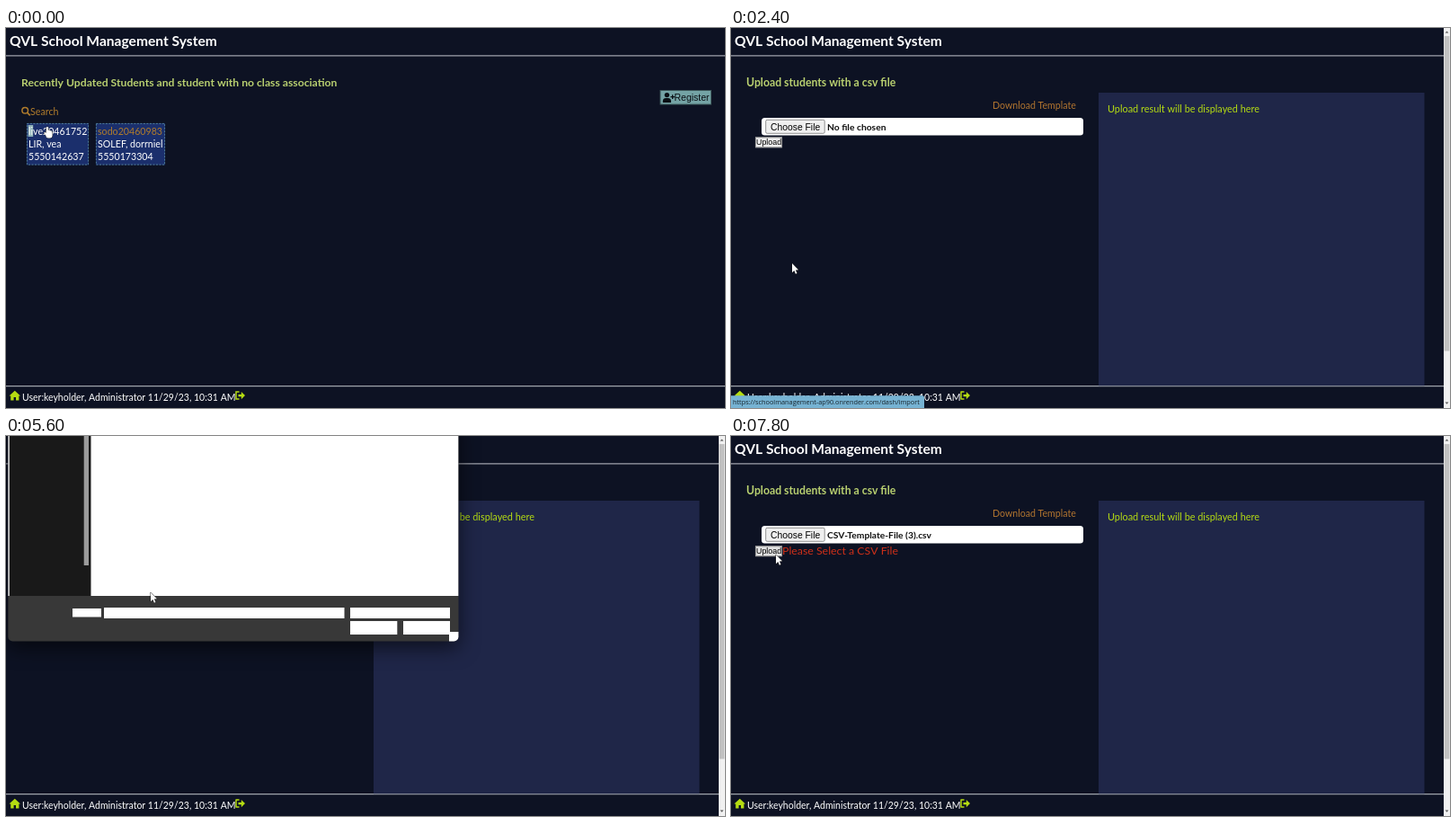
An HTML page with a canvas that plays this animation: 800x423 px, repeating every 8 s.

```html
<!DOCTYPE html>
<html lang="en">
<head>
<meta charset="utf-8">
<title>School management</title>
<style>
html, body { margin: 0; width: 100%; height: 100%; overflow: hidden; background: #0d1223; }
canvas { display: block; width: 800px; height: 423px; }
</style>
</head>
<body>
<canvas id="stage"></canvas>
<script>
const W = 800, H = 423, LOOP = 8000, STEP = 200;
const canvas = document.getElementById('stage');
const ctx = canvas.getContext('2d');
const ratio = window.devicePixelRatio || 1;
canvas.width = W * ratio;
canvas.height = H * ratio;

const LATO = 'Lato, sans-serif';
const ARIAL = '"Liberation Sans", sans-serif';
const SEGOE = '"Open Sans", sans-serif';
const BG = '#0d1223', LIME = '#b5dc12', HEAD = '#b9d070', LINK = '#b07c2c';

// Pointer stops: time, x, y
const path = [
  [0, 46, 110], [200, 44, 135], [400, 34, 230], [600, 18, 350], [800, 12, 399],
  [1000, 9, 404], [1200, 9, 405], [1600, 45, 330], [2000, 68, 262], [2400, 68, 262],
  [2800, 65, 220], [3400, 42, 129], [4200, 42, 129], [4600, 68, 107], [5000, 68, 107],
  [5400, 80, 115], [5600, 161, 174], [6000, 316, 190], [6400, 160, 60], [6800, 160, 60],
  [7200, 90, 122], [7600, 50, 132], [8000, 50, 132]
];

function pointerAt(t) {
  const i = path.findIndex(p => p[0] > t);
  const [t0, x0, y0] = path[i - 1], [t1, x1, y1] = path[i];
  const k = (t - t0) / (t1 - t0);
  return [x0 + (x1 - x0) * k, y0 + (y1 - y0) * k];
}

function rect(x, y, w, h, color) {
  ctx.fillStyle = color;
  ctx.fillRect(x, y, w, h);
}

function round(x, y, w, h, r, color) {
  ctx.fillStyle = color;
  ctx.beginPath();
  ctx.roundRect(x, y, w, h, r);
  ctx.fill();
}

function frame(x, y, w, h, color, r = 0, line = 0.8) {
  ctx.strokeStyle = color;
  ctx.lineWidth = line;
  ctx.beginPath();
  ctx.roundRect(x, y, w, h, r);
  ctx.stroke();
}

function poly(points, color) {
  ctx.fillStyle = color;
  ctx.beginPath();
  points.forEach(([x, y]) => ctx.lineTo(x, y));
  ctx.closePath();
  ctx.fill();
}

function line(points, color, width = 0.8) {
  ctx.strokeStyle = color;
  ctx.lineWidth = width;
  ctx.beginPath();
  points.forEach(([x, y]) => ctx.lineTo(x, y));
  ctx.stroke();
}

function dot(x, y, r, color) {
  ctx.fillStyle = color;
  ctx.beginPath();
  ctx.arc(x, y, r, 0, Math.PI * 2);
  ctx.fill();
}

function text(str, x, y, size, color, family = LATO, weight = 400, align = 'left') {
  ctx.font = `${weight} ${size}px ${family}`;
  ctx.fillStyle = color;
  ctx.textAlign = align;
  ctx.fillText(str, x, y);
}

const label = (str, x, y, align) => text(str, x, y + 2.6, 7.3, '#f2f2f2', SEGOE, 400, align);

function chevron(x, y, color = '#b5b5b5') {
  line([[x - 2, y - 1], [x, y + 1], [x + 2, y - 1]], color, 0.7);
}

function shell(right) {
  rect(0, 0, W, H, BG);
  text('QVL School Management System', 4, 20, 15.6, '#fff', LATO, 700);
  rect(0, 30.4, right, 1, '#c3c6cd');
  rect(0, 398.2, right, 1, '#c3c6cd');

  poly([[3.5, 409.6], [9.8, 403.8], [16, 409.6], [14.4, 409.6], [14.4, 414.4],
    [11, 414.4], [11, 411], [8.6, 411], [8.6, 414.4], [5.2, 414.4], [5.2, 409.6]], LIME);
  text('User:keyholder, Administrator 11/29/23, 10:31 AM', 18, 415, 10.5, '#fff');
  line([[259.5, 405], [256, 405], [256, 413], [259.5, 413]], LIME, 1.5);
  rect(258.5, 407.9, 4, 2.4, LIME);
  poly([[261.8, 405], [266, 409.1], [261.8, 413.2]], LIME);
}

function card(x, w, id, name, phone, hover) {
  rect(x, 106, w, 46.5, '#1b2f6c');
  ctx.setLineDash([2, 1.5]);
  frame(x + 0.4, 106.4, w - 0.8, 45.7, '#5d93a5');
  ctx.setLineDash([]);
  if (hover) rect(x + 1.6, 108, 5.6, 13, '#8fb3b8');
  text(id, x + 2, 118.5, 10.65, hover ? '#fff' : LINK);
  text(name, x + 2, 132.6, 10.65, '#fff');
  text(phone, x + 2, 146.8, 10.65, '#fff');
}

function studentsPage(t) {
  shell(W);
  text('Recently Updated Students and student with no class association', 17, 64.6, 12.2, HEAD, LATO, 700);

  rect(727.5, 69, 57.5, 16.5, '#3c5658');
  rect(728.5, 70, 55.5, 14.5, '#74a3a5');
  dot(735.4, 74.6, 2.7, '#0a0f14');
  round(730.8, 78, 9.2, 5, [3.5, 3.5, 0.5, 0.5], '#0a0f14');
  rect(739.4, 76, 4.6, 1.3, '#0a0f14');
  rect(741, 74.3, 1.3, 4.7, '#0a0f14');
  text('Register', 743.5, 81.3, 10.5, '#0a0f14', ARIAL);

  ctx.strokeStyle = LINK;
  ctx.lineWidth = 1.5;
  ctx.beginPath();
  ctx.arc(21.2, 91.8, 3.3, 0, Math.PI * 2);
  ctx.stroke();
  line([[23.6, 94.2], [26.8, 97.4]], LINK, 1.7);
  text('Search', 27, 97, 10.7, LINK);

  card(23, 69, 'live20461752', 'LIR, vea', '5550142637', t === 0);
  card(100, 77, 'sodo20460983', 'SOLEF, dorrniel', '5550173304');
}

function scrollbar() {
  rect(793, 0, 7, H, '#f1f1f1');
  rect(793.6, 9, 5.8, 350.5, '#c1c1c1');
  poly([[794.6, 5.6], [796.5, 3.4], [798.4, 5.6]], '#555');
  poly([[794.6, 416.6], [796.5, 418.8], [798.4, 416.6]], '#555');
}

function uploadPage(t) {
  const failed = t >= 3800, chosen = t >= 7000;
  const hover = (t >= 3400 && t <= 4200) || t >= 7600;
  const dy = failed ? 0.9 : 0;
  shell(793);
  text('Upload students with a csv file', 17, 64.6, 12.25, HEAD, LATO, 700);
  text('Download Template', 291, 90.3, 10.6, '#b2752f');

  round(34, 100, 358, 19.5, 3.5, '#fff');
  round(38.7, 102.3, 65.5, 15, 1.5, '#efefef');
  frame(38.7, 102.3, 65.5, 15, '#767676', 1.5);
  text('Choose File', 44, 113.5, 10.35, '#000', ARIAL);
  text(chosen ? 'CSV-Template-File (3).csv' : 'No file chosen', 107, 113.6, 10.3, '#111', LATO, 700);

  rect(27, 121.4 + dy, 30, 11.8, hover ? '#e2e2e2' : '#efefef');
  frame(27.4, 121.8 + dy, 29.2, 11, '#767676');
  text('Upload', 28, 130.4 + dy, 8.87, '#000', ARIAL);
  if (failed) text('Please Select a CSV File', 57, 131.8, 12.35, '#cf3019');

  rect(409, 72, 362.5, 326.2, '#1f2648');
  text('Upload result will be displayed here', 419, 93.6, 10.9, LIME);
  scrollbar();
}

function statusBar() {
  round(0, 409.3, 215, 13.7, [0, 2, 0, 0], '#76b3d3');
  text('https://schoolmanagement-ap90.onrender.com/dash/import', 2, 419, 7.33, '#17242c', SEGOE);
}

function folder(x, y, content) {
  round(x, y, 33, 16, 3, '#e0a31b');
  round(x, y + 5, 66, 44, 3, '#e0a31b');
  content(x, y);
  const g = ctx.createLinearGradient(0, y + 22, 0, y + 52);
  g.addColorStop(0, '#fde492');
  g.addColorStop(1, '#f6c644');
  ctx.fillStyle = g;
  ctx.beginPath();
  ctx.moveTo(x, y + 30);
  ctx.lineTo(x + 23, y + 30);
  ctx.lineTo(x + 30, y + 25);
  ctx.lineTo(x + 66, y + 25);
  ctx.lineTo(x + 66, y + 49);
  ctx.quadraticCurveTo(x + 66, y + 52, x + 63, y + 52);
  ctx.lineTo(x + 3, y + 52);
  ctx.quadraticCurveTo(x, y + 52, x, y + 49);
  ctx.fill();
}

function pdfPaper(x, y) {
  poly([[x + 18, y + 10], [x + 44, y + 10], [x + 52, y + 20], [x + 52, y + 32], [x + 18, y + 32]], '#eceff1');
  rect(x + 36, y + 14, 4, 14, '#b3271f');
  round(x + 15, y + 12, 26, 11, 1.5, '#b3271f');
  text('PDF', x + 28, y + 20.6, 8, '#fff', SEGOE, 700, 'center');
}

function idPaper(x, y) {
  rect(x + 14, y + 11, 48, 24, '#dcd6bd');
  rect(x + 20, y + 15, 10, 13, '#c9c6b6');
  dot(x + 25, y + 19.5, 2.4, '#2c2a28');
  round(x + 21, y + 22.5, 8, 5, [3, 3, 0, 0], '#2c2a28');
  for (let i = 0; i < 3; i++) rect(x + 35, y + 16 + i * 3.5, 22, 0.7, '#b5ae95');
}

function pin(x, y) {
  line([[x - 2.6, y + 2.8], [x, y]], '#a9a9a9', 0.8);
  poly([[x - 2, y - 0.8], [x + 0.6, y - 3], [x + 3, y - 0.6], [x + 0.8, y + 2]], '#a9a9a9');
}

const icons = {
  square: (x, y, c) => round(x, y - 3.5, 7.5, 7, 1, c),
  screen(x, y) {
    round(x, y - 3.6, 9, 6, 0.8, '#45a6e0');
    rect(x + 2.5, y + 2.8, 4, 0.9, '#8fc7e8');
  },
  page(x, y) {
    round(x + 0.8, y - 4, 7, 8, 0.8, '#c9d8e6');
    for (let i = 0; i < 3; i++) rect(x + 2.2, y - 2 + i * 2, 4.2, 0.8, '#54799e');
  },
  down(x, y) {
    line([[x + 4, y - 4], [x + 4, y + 1.5]], '#27b39a', 1.1);
    line([[x + 1.5, y - 0.8], [x + 4, y + 1.7], [x + 6.5, y - 0.8]], '#27b39a', 1.1);
    rect(x + 1, y + 3, 6, 1, '#27b39a');
  },
  folder(x, y) {
    round(x, y - 3.6, 4, 3, 0.6, '#e0a31b');
    round(x, y - 2.6, 8.5, 6, 0.8, '#f7cd56');
  },
  drive(x, y, c) {
    round(x, y - 1.5, 9, 3.6, 1.4, c);
  }
};

const PURPLE = '#9b3c8f';
const rows = [
  ['Gallery', 'square', 18, 2, '#2f7fd6'], ['Desktop', 'screen', 18, 30], ['Media (D:)', 'square', 18, 44, PURPLE],
  ['Documents', 'page', 18, 58], ['Downloads', 'down', 18, 72], ['workspace', 'folder', 18, 86.3],
  ['This PC', 'screen', 18, 114.3], ['Local Disk (C:)', 'drive', 23, 128.5, '#b9d2e2'],
  ['Media (D:)', 'square', 23, 142.8, PURPLE], ['Local Disk (E:)', 'drive', 23, 157, '#d2d2d2'],
  ['Spare Drive (G:)', 'drive', 23, 171.2, '#55585a']
];

function sidebar() {
  ctx.save();
  ctx.beginPath();
  ctx.rect(3, 0, 82, 178);
  ctx.clip();
  rows.forEach(([name, icon, x, y, color], i) => {
    icons[icon](x, y, color);
    label(name, x + 10.7, y);
    if (i > 0 && i < 6) pin(80, y);
  });
  rect(9, 16, 71, 0.7, '#4a4a4a');
  rect(9, 99.5, 71, 0.7, '#4a4a4a');
  rect(23.5, 124.6, 3.4, 3, '#2f9be0');
  ctx.restore();
  rect(86.7, 0, 5.3, 104.5, '#8b8b8b');
}

function files() {
  ctx.save();
  ctx.beginPath();
  ctx.rect(95, 0, 408, 178);
  ctx.clip();
  poly([[121, 3], [156, 3], [170, 17], [170, 68], [121, 68]], '#f7f7f7');
  poly([[156, 3], [156, 17], [170, 17]], '#c9c9c9');
  round(112.5, 19, 33.5, 34, 2, '#1d7f46');
  label('CSV-Template-File', 145.5, 79, 'center');
  label('(3).csv', 145.5, 89.5, 'center');
  folder(210, 8, pdfPaper);
  label('Documents', 243, 79, 'center');
  chevron(103.3, 105);
  label('Earlier this week', 109, 105);
  folder(113, 124.5, idPaper);
  rect(495.8, 0, 5.3, 39.5, '#8b8b8b');
  ctx.restore();
}

function dialog(loading) {
  ctx.save();
  ctx.shadowColor = 'rgba(0,0,0,.6)';
  ctx.shadowBlur = 22 * ratio;
  ctx.shadowOffsetY = 7 * ratio;
  round(2.3, -20, 501.2, 248.5, 5, '#383838');
  ctx.restore();
  rect(3, 0, 500, 178, '#191919');

  if (loading) {
    rect(2.4, 0, 1.4, 178, '#f4f4f4');
    rect(86.7, 0, 5.3, 144, '#9b9b9b');
    rect(94.5, 0, 408.8, 178, '#fff');
    const blanks = [[74, 192, 32, 9.5], [109, 191, 267.5, 12], [383, 191, 111, 12],
      [383, 206, 52.3, 15], [442, 206, 52, 15]];
    blanks.forEach(b => rect(...b, '#fff'));
    round(493, 218, 10.4, 10.4, [0, 0, 5, 0], '#fff');
    return;
  }

  rect(95, 0, 0.8, 178, '#333');
  sidebar();
  files();
  label('File name:', 106, 197.2, 'right');
  frame(109.3, 191.3, 266.8, 11.6, '#a2a2a2');
  chevron(371, 197.2);
  frame(383.3, 191.3, 110.4, 11.6, '#858585');
  label('All Files (*.*)', 384.5, 197.2);
  chevron(489, 197.2);
  frame(383.3, 206.3, 51.8, 14.6, '#b8b8b8');
  label('Open', 409, 213.8, 'center');
  frame(442.3, 206.3, 51.4, 14.6, '#777');
  label('Cancel', 468, 213.8, 'center');
  for (let i = 0; i < 3; i++)
    for (let j = 0; j <= i; j++) rect(501 - j * 2, 222 + i * 2, 1.1, 1.1, '#aaa');
}

function arrow(x, y) {
  ctx.beginPath();
  [[0, 0], [0, 10.2], [2.3, 8.1], [3.9, 11.7], [5.5, 11], [3.9, 7.5], [7, 7.3]]
    .forEach(([px, py]) => ctx.lineTo(x + px, y + py));
  ctx.closePath();
  ctx.fillStyle = '#fff';
  ctx.strokeStyle = '#111';
  ctx.lineWidth = 0.9;
  ctx.lineJoin = 'round';
  ctx.stroke();
  ctx.fill();
}

function hand(x, y) {
  ctx.beginPath();
  ctx.roundRect(x - 1.3, y, 2.6, 9, 1.3);
  ctx.roundRect(x + 0.8, y + 3.8, 2.4, 5, 1.2);
  ctx.roundRect(x + 2.8, y + 4.3, 2.4, 5, 1.2);
  ctx.roundRect(x - 1.6, y + 5.6, 7.2, 6.8, [1, 1.2, 2.4, 2.6]);
  ctx.moveTo(x - 1.2, y + 10.5);
  ctx.lineTo(x - 4, y + 6.8);
  ctx.lineTo(x - 2.8, y + 6);
  ctx.lineTo(x - 1, y + 7.6);
  ctx.strokeStyle = '#111';
  ctx.lineWidth = 0.9;
  ctx.stroke();
  ctx.fillStyle = '#fff';
  ctx.fill();
}

function draw(t) {
  ctx.setTransform(ratio, 0, 0, ratio, 0, 0);
  if (t < 1200) studentsPage(t);
  else if (t < 2200) shell(W);
  else uploadPage(t);

  if (t >= 2000 && t < 2800) statusBar();
  if (t >= 5600 && t < 7000) dialog(t < 5800);

  const [x, y] = pointerAt(t);
  const overLink = t === 0 || t === 1000;
  (overLink ? hand : arrow)(x, y);
}

function tick(now) {
  const t = now % LOOP;
  draw(Math.floor(t / STEP) * STEP);
  requestAnimationFrame(tick);
}
requestAnimationFrame(tick);
</script>
</body>
</html>
```
